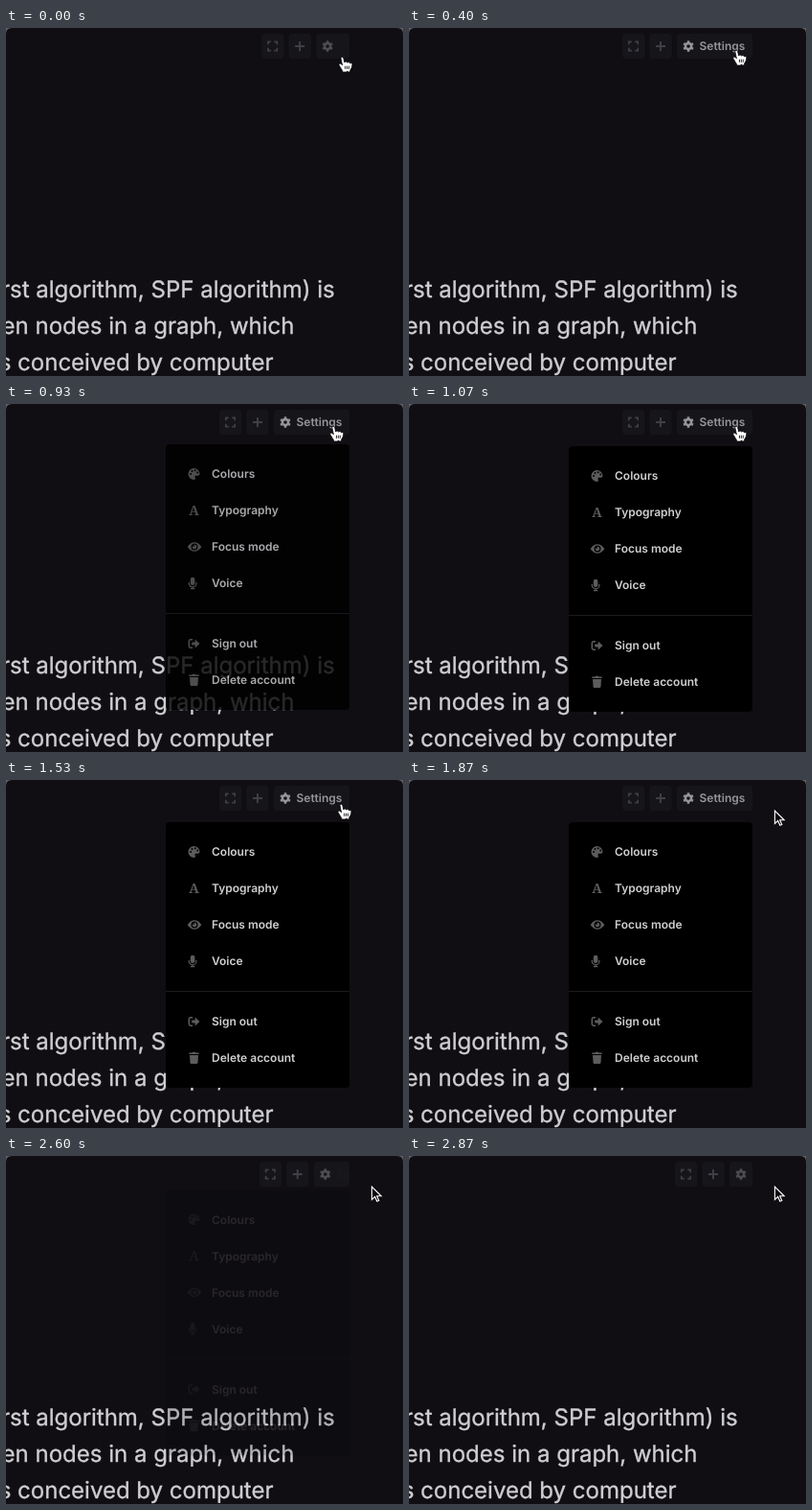
Recreate the animation shown at these times as an HTML page. Size 415 by 363 pixels, loop 3.07 s.

```html
<!DOCTYPE html>
<html lang="en">
<head>
<meta charset="utf-8">
<title>Settings menu</title>
<style>
  html, body { margin: 0; width: 100%; height: 100%; overflow: hidden; background: #100e13; }
  svg { display: block; }
  text { font-family: Inter, "Liberation Sans", sans-serif; font-optical-sizing: none; text-rendering: geometricPrecision; }
  .prose text { font-size: 24px; fill: #cfced0; stroke: #cfced0; stroke-width: .35; text-anchor: end; }
  .label { font-size: 12px; font-weight: 600; fill: #d0cfd1; }
  .box { fill: #161519; }
  .tool { fill: none; stroke: #403f46; }
  .icon { fill: #5c5c5e; stroke: none; }
  .line { fill: none; stroke: #5c5c5e; stroke-width: 1.5; }
  .hole { fill: #000; }
</style>
</head>
<body>
<svg id="stage" width="415" height="363" viewBox="0 0 415 363">
  <path d="M0 0H6Q0 0 0 6ZM415 0H409Q415 0 415 6Z" fill="#626166"/>

  <g class="prose">
    <text x="343.7" y="281">First algorithm, SPF algorithm) is</text>
    <text x="301.5" y="319">between nodes in a graph, which</text>
    <text x="279.5" y="357">was conceived by computer</text>
  </g>

  <!-- Toolbar: origin is the left edge of the settings button -->
  <g id="tools">
    <rect class="box" x="-57" y="6" width="23.5" height="26" rx="4"/>
    <path class="tool" stroke-width="1.7" transform="translate(-45.5 19)"
      d="M-4.7-1.7V-4.7H-1.7M1.7-4.7H4.7V-1.7M4.7 1.7V4.7H1.7M-1.7 4.7H-4.7V1.7"/>
    <rect class="box" x="-28.7" y="6" width="23.5" height="26" rx="4"/>
    <path class="tool" stroke-width="2" transform="translate(-17 19)" d="M-5 0H5M0-5V5"/>
  </g>
  <svg id="settings" y="6" height="26">
    <rect class="box" width="100%" height="26" rx="4"/>
    <g id="gear" transform="translate(12 13)" fill="none" stroke="#979698">
      <circle r="3.1" stroke-width="2.6"/>
      <circle r="4.8" stroke-width="1.8" pathLength="12" stroke-dasharray="1" stroke-dashoffset="-.5"/>
    </g>
    <text id="caption" class="label" x="23.5" y="17.3" style="fill:#979698">Settings</text>
  </svg>

  <g id="menu">
    <rect width="192" height="277" rx="4"/>
    <path d="M0 176.5H192" stroke="#1c1b1e"/>
    <g id="items"></g>
  </g>

  <g id="hand">
    <g transform="translate(.2 -.7) scale(.95)">
      <path fill="#fff" stroke="#000" stroke-width=".8" stroke-linejoin="round"
        d="M-1.2 1.4Q-1 0 .2 0Q1.4.1 1.8 1.6L2.8 6Q3.2 4.9 4.5 5Q5.8 5.2 6 6.3Q6.5 5.3 7.6 5.5Q8.8 5.8 9 7Q9.5 6.3 10.5 6.6Q11.4 7 11.3 8.5Q11.3 11.5 9.8 13.2Q8.8 14.4 8.8 16.4H6.7L5.9 15.3L5 16.5H.7Q.7 14.6-.8 13Q-1.8 10.8-3.3 9.1Q-3.8 7.5-2.2 7Q-.8 7.1.4 9Z"/>
      <path stroke="#000" stroke-width=".9" d="M3.6 9.8V13.2M5.6 9.8V13.2M7.6 9.8V13.2"/>
    </g>
  </g>
  <path id="arrow" fill="#08070a" stroke="#fff" stroke-width="1.1"
    d="M.6 1V14.5L3.8 11.5L6 16.3L8 15.4L5.9 10.8H10.4Z"/>
</svg>

<script>
const $ = id => document.getElementById(id);

const items = [
  ["Colours", 31, `<path class="icon" d="M0-6A6 6 0 1 0 0 6C2 6 1.5 4.5 1 3.6C.6 2.4 1.4 1.8 2.4 1.8H4.2Q6 1.8 6 0A6 6 0 0 0 0-6Z"/>
    <g class="hole"><circle cx="-3.4" cy=".1" r="1"/><circle cx="-2" cy="-3" r="1"/><circle cx="1.2" cy="-3.7" r="1"/><circle cx="3.7" cy="-1.5" r="1"/></g>`],
  ["Typography", 69, `<text class="icon" text-anchor="middle" y="5" style="font:bold 14px 'Noto Serif','Liberation Serif',serif">A</text>`],
  ["Focus mode", 107, `<path class="icon" d="M-6.8 0Q-3.8-4.8.5-4.8T7.8 0Q4.8 4.8.5 4.8T-6.8 0Z"/>
    <circle class="hole" cx=".5" r="3.5"/><circle class="icon" cx=".5" r="2.3"/><circle class="hole" cx="-.5" cy="-1" r=".9"/>`],
  ["Voice", 145, `<rect class="icon" x="-3.7" y="-6.2" width="4.6" height="8.2" rx="2.3"/>
    <path class="line" style="stroke-width:1.2" d="M-5.2-1V0A3.8 3.8 0 0 0 2.4 0V-1M-1.4 3.8V6M-3.6 5.7H.8"/>`],
  ["Sign out", 208, `<path class="line" d="M-1.4-4.2H-3.6Q-5.2-4.2-5.2-2.6V2.6Q-5.2 4.2-3.6 4.2H-1.4"/>
    <path class="icon" d="M-2.2-1.6H1.2V-4.4L6 0L1.2 4.4V1.6H-2.2Z"/>`],
  ["Delete account", 246, `<path class="icon" d="M-5.2-5.4H-2L-1.4-6.2H1.4L2-5.4H5.2V-3.9H-5.2ZM-4.5-3.1H4.5L4 4.8Q3.9 6.1 2.7 6.1H-2.7Q-3.9 6.1-4 4.8Z"/>`]
];
$("items").innerHTML = items.map(([name, y, icon]) =>
  `<g transform="translate(29.5 ${y})">${icon}<text class="label" x="18.5" y="4.3">${name}</text></g>`).join("");

const LOOP = 3070;
// Moments at which the picture is refreshed
const ticks = [0, 70, 140, 200, 270, 330, 400, 800, 870, 930, 1000, 1070,
  1530, 1600, 1670, 1730, 1800, 1870, 2470, 2530, 2600, 2670, 2730, 2800, 2870];

const clamp = v => Math.min(1, Math.max(0, v));
const mix = (a, b, p) => a + (b - a) * p;
const easeOut = p => 1 - (1 - p) ** 2;

// cubic-bezier(.25, .1, .25, 1)
function ease(x) {
  if (x <= 0 || x >= 1) return clamp(x);
  const curve = (a, b, s) => 3 * a * s * (1 - s) ** 2 + 3 * b * s * s * (1 - s) + s ** 3;
  let lo = 0, hi = 1;
  for (let i = 0; i < 20; i++) {
    const mid = (lo + hi) / 2;
    if (curve(.25, .25, mid) < x) lo = mid; else hi = mid;
  }
  return curve(.1, 1, lo);
}

const fade = (t, start, length) => ease((t - start) / length);

// Two pointer moves: start time, end time, from, to
const moves = [
  [0, 400, [351, 31], [341.8, 24]],
  [1530, 1870, [350, 26], [381.8, 31]]
];

function pointer(t) {
  const [start, end, from, to] = moves.findLast(m => m[0] <= t);
  const p = easeOut(clamp((t - start) / (end - start)));
  return from.map((v, i) => mix(v, to[i], p));
}

const move = (el, x, y) => el.setAttribute("transform", `translate(${x} ${y})`);

function draw(t) {
  const wide = fade(t, -78, 500) - fade(t, 2370, 500);
  const left = mix(335, 280, wide);
  const glow = (wide * wide * (3 - 2 * wide)) ** 2;
  move($("tools"), left, 0);
  $("settings").setAttribute("x", left);
  $("settings").setAttribute("width", 359 - left);
  $("gear").setAttribute("opacity", mix(.43, 1, glow));
  $("caption").setAttribute("opacity", glow);

  const open = fade(t, 780, 300) - fade(t, 2424, 300);
  $("menu").setAttribute("opacity", open);
  move($("menu"), 167, 44 - 10 * (1 - open));

  const [x, y] = pointer(t);
  const over = x < 359;
  $("hand").style.display = over ? "" : "none";
  $("arrow").style.display = over ? "none" : "";
  move($(over ? "hand" : "arrow"), x, y);
}

const begin = performance.now();
function frame() {
  const t = (performance.now() - begin) % LOOP;
  draw(ticks.findLast(k => k <= t));
  requestAnimationFrame(frame);
}
frame();
</script>
</body>
</html>
```
